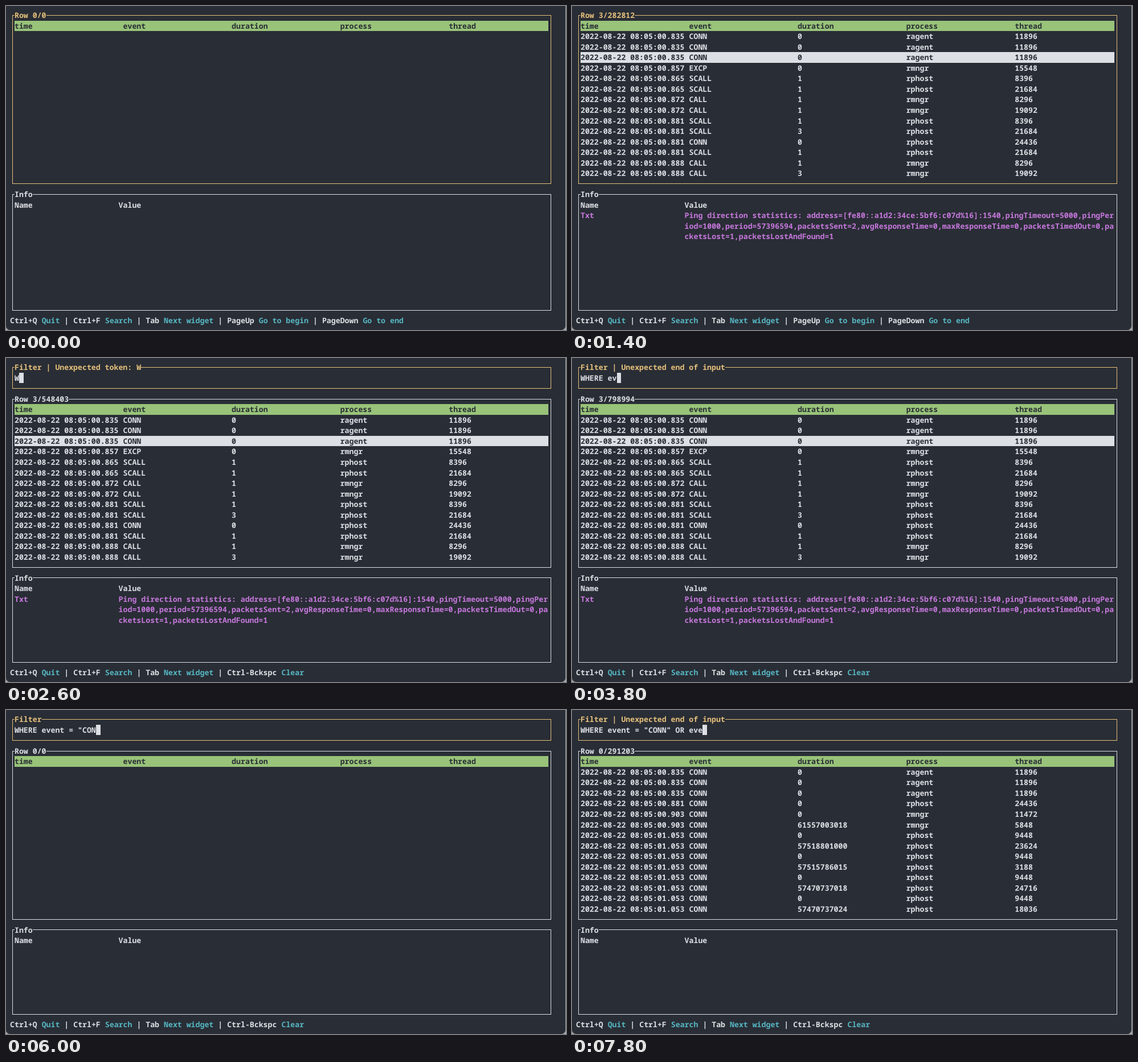
An HTML page that plays this animation: 983x570 px, repeating every 8 s.

```html
<!DOCTYPE html>
<html lang="en">
<head>
<meta charset="utf-8">
<title>Log viewer</title>
<style>
  html, body { margin: 0; width: 100%; height: 100%; overflow: hidden; background: #a9adb3; }
  #term {
    position: absolute; left: 0; top: 0; width: 982px; height: 570px; overflow: hidden;
    background: #292d35; border-radius: 0 0 7px 7px;
    font: 700 13.233px/18.52px "Noto Sans Mono", "DejaVu Sans Mono", monospace;
    text-rendering: geometricPrecision; font-variant-ligatures: none;
  }
  #term div { position: absolute; white-space: pre; box-sizing: border-box; }
  .box { left: 11px; width: 946px; border: 1px solid; }
  .title { background: #292d35; }
  .white { color: #dcdfe4; }
  .gold { color: #e5c07b; }
  .cyan { color: #56b6c2; }
  .pink { color: #c678dd; }
  .dark { color: #292d35; }
  .green-bar { background: #98c379; }
  .white-bar { background: #dcdfe4; }
</style>
</head>
<body>
<div id="term"></div>
<script>
const LOOP = 8000, STEP = 200;
const CELL = 7.94, LINE = 18.52, LEFT = 7.06, TOP = 7.3;
const COLUMNS = [1, 25, 49, 73, 97];
const HEADER = ["time", "event", "duration", "process", "thread"];

const parseRows = list => list.trim().split("\n").map(line => {
  const [time, ...rest] = line.trim().split(" ");
  return ["2022-08-22 08:05:" + time, ...rest];
});

const ALL_ROWS = parseRows(`
  00.835 CONN 0 ragent 11896
  00.835 CONN 0 ragent 11896
  00.835 CONN 0 ragent 11896
  00.857 EXCP 0 rmngr 15548
  00.865 SCALL 1 rphost 8396
  00.865 SCALL 1 rphost 21684
  00.872 CALL 1 rmngr 8296
  00.872 CALL 1 rmngr 19092
  00.881 SCALL 1 rphost 8396
  00.881 SCALL 3 rphost 21684
  00.881 CONN 0 rphost 24436
  00.881 SCALL 1 rphost 21684
  00.888 CALL 1 rmngr 8296
  00.888 CALL 3 rmngr 19092`);

const CONN_ROWS = parseRows(`
  00.835 CONN 0 ragent 11896
  00.835 CONN 0 ragent 11896
  00.835 CONN 0 ragent 11896
  00.881 CONN 0 rphost 24436
  00.903 CONN 0 rmngr 11472
  00.903 CONN 61557003018 rmngr 5848
  01.053 CONN 0 rphost 9448
  01.053 CONN 57518801000 rphost 23624
  01.053 CONN 0 rphost 9448
  01.053 CONN 57515786015 rphost 3188
  01.053 CONN 0 rphost 9448
  01.053 CONN 57470737018 rphost 24716
  01.053 CONN 0 rphost 9448
  01.053 CONN 57470737024 rphost 18036`);

const DETAILS = "Ping direction statistics: address=[fe80::a1d2:34ce:5bf6:c07d%16]:1540," +
  "pingTimeout=5000,pingPeriod=1000,period=57396594,packetsSent=2,avgResponseTime=0," +
  "maxResponseTime=0,packetsTimedOut=0,packetsLost=1,packetsLostAndFound=1";

const QUERY = 'WHERE event = "CONN" OR eve';
const FILTER_OPEN = 2000, STRING_OPEN = 5400, MATCH = 6200;

// Piecewise linear tracks of [time, value]
const TYPED = [[2400, 0], [2600, 1], [3600, 6], [3800, 8], [4800, 13], [5000, 13], [5200, 14], [7800, 27]];
const TOTAL = [[0, 0], [1400, 282812], [2600, 548403], [3800, 798994], [5200, 1111202], [5400, 1155000]];
const MATCHED = [[6000, 0], [7800, 291203]];

function valueAt(track, t) {
  if (t <= track[0][0]) return track[0][1];
  for (let i = 1; i < track.length; i++) {
    const [t0, v0] = track[i - 1], [t1, v1] = track[i];
    if (t <= t1) return Math.round(v0 + (v1 - v0) * (t - t0) / (t1 - t0));
  }
  return track[track.length - 1][1];
}

const x = col => LEFT + col * CELL;
const y = row => TOP + row * LINE;
const midline = row => Math.floor(y(row + 0.5));

const text = (col, row, str, cls = "white") =>
  `<div class="${cls}" style="left:${x(col)}px;top:${y(row)}px">${str}</div>`;

function bar(col, row, cells, cls) {
  const top = Math.round(y(row)), left = Math.round(x(col));
  return `<div class="${cls}" style="left:${left}px;top:${top}px;` +
    `width:${Math.round(x(col + cells)) - left}px;height:${Math.round(y(row + 1)) - top}px"></div>`;
}

function box(first, last, title, cls) {
  const top = midline(first);
  return `<div class="box ${cls}" style="top:${top}px;height:${midline(last) - top + 1}px"></div>` +
    text(1, first, title, "title " + cls);
}

const cells = (row, values, cls) => values.map((v, i) => text(COLUMNS[i], row, v, cls)).join("");

function filterError(query) {
  if (!query || /"/.test(query) && !/ OR?/.test(query.slice(20))) return "";
  if (/^W(H(ER?)?)?$/.test(query)) return " | Unexpected token: " + query;
  return query.endsWith(" O") ? " | Unexpected token: O" : " | Unexpected end of input";
}

function footer(filtering) {
  const keys = [["Ctrl+Q", "Quit"], ["Ctrl+F", "Search"], ["Tab", "Next widget"]].concat(
    filtering ? [["Ctrl-Bckspc", "Clear"]] : [["PageUp", "Go to begin"], ["PageDown", "Go to end"]]);
  let col = 0;
  return keys.map(([key, label], i) => {
    const bars = i ? text(col - 2, 29, "|") : "";
    const out = bars + text(col, 29, key) + text(col + key.length + 1, 29, label, "cyan");
    col += key.length + label.length + 4;
    return out;
  }).join("");
}

function render(t) {
  const filtering = t >= FILTER_OPEN;
  const matching = t >= STRING_OPEN;
  const query = QUERY.slice(0, valueAt(TYPED, t));
  const rows = matching ? (t >= MATCH ? CONN_ROWS : []) : (t >= STEP ? ALL_ROWS : []);
  const selected = matching ? 0 : Math.max(0, Math.min(3, t / STEP - 2));
  const count = valueAt(matching ? MATCHED : TOTAL, t);
  const table = filtering ? 3 : 0;
  const info = table + 17;
  let html = "";

  if (filtering) {
    html += box(0, 2, "Filter" + filterError(query), "gold") +
      text(1, 1, query) + bar(1 + query.length, 1, 1, "white-bar");
  }

  html += box(table, table + 16, `Row ${selected}/${count}`, filtering ? "white" : "gold") +
    bar(1, table + 1, 118, "green-bar") + cells(table + 1, HEADER, "dark");
  rows.forEach((values, i) => {
    const row = table + 2 + i, active = i + 1 === selected;
    if (active) html += bar(1, row, 118, "white-bar");
    html += cells(row, values, active ? "dark" : "white");
  });

  html += box(info, 28, "Info", "white") + text(1, info + 1, "Name") + text(24, info + 1, "Value");
  if (selected) {
    html += text(1, info + 2, "Txt", "pink");
    DETAILS.match(/.{1,95}/g).forEach((line, i) => html += text(24, info + 2 + i, line, "pink"));
  }
  return html + footer(filtering);
}

const term = document.getElementById("term");
const start = performance.now();
let shown = -1;

function tick() {
  const t = Math.floor((performance.now() - start) % LOOP / STEP) * STEP;
  if (t !== shown) term.innerHTML = render(shown = t);
  requestAnimationFrame(tick);
}
tick();
</script>
</body>
</html>
```
